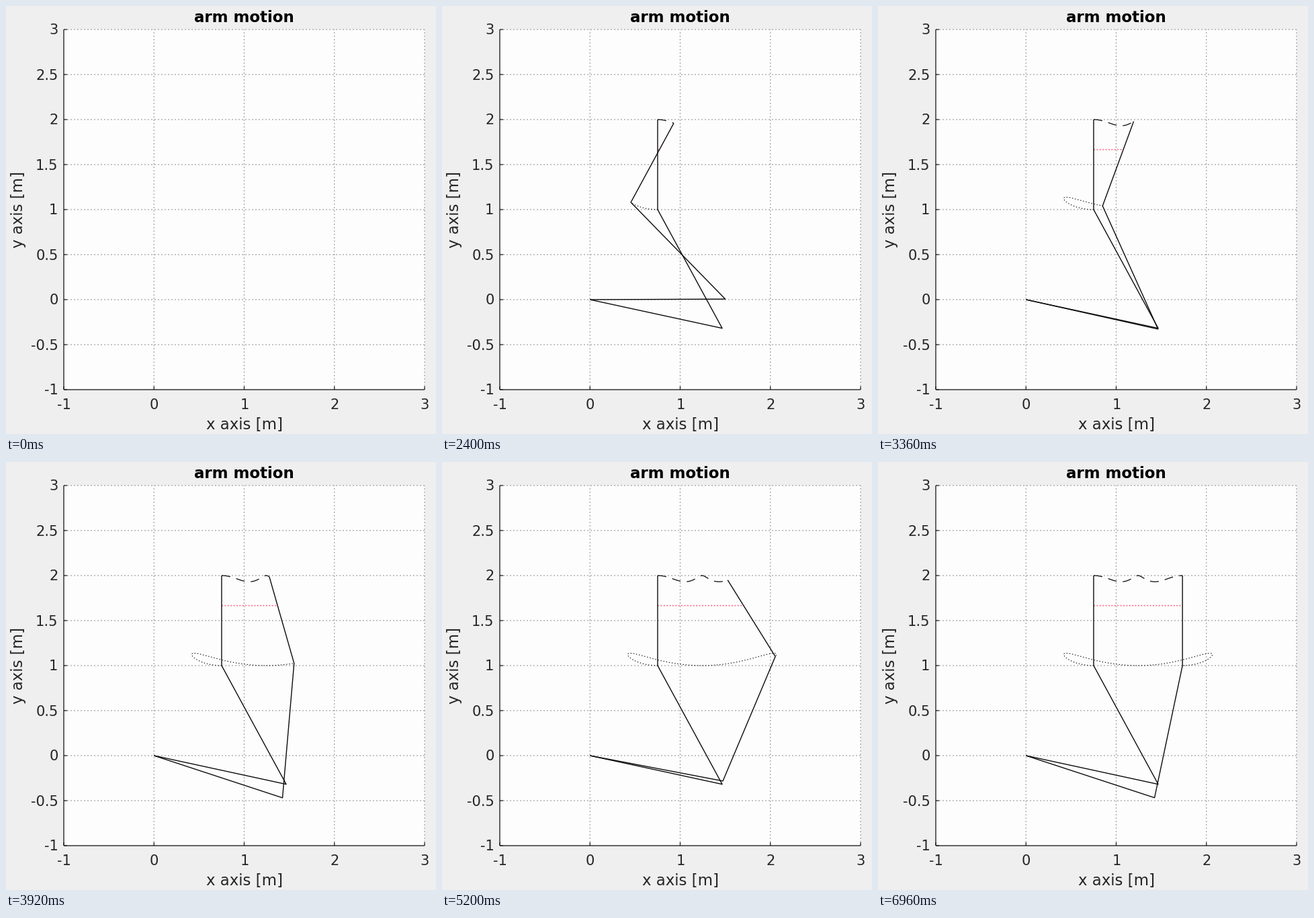
Write a matplotlib script that moves like this. It is 640 px wide and 637 px high and loops after 7120 ms.

```python
import numpy as np
import matplotlib.pyplot as plt
from matplotlib.animation import FuncAnimation

W, H, DPI = 640, 637, 100
STEP_MS, FRAMES = 80, 89
START = 24                      # frame on which the arm appears
PX = 72 / DPI                   # points per pixel

LEFT, RIGHT, TOP, BOTTOM = 86, 623, 35, 571
LINK, HAND = 1.5, 1.0           # arm link lengths in metres
SWING = 0.654                   # wrist swing in radians
X0, X1, Y_MID = 0.75, 1.735, 5 / 3

INK, GRID = "#262626", "#a0a0a0"


def sx(x):
    return LEFT + (RIGHT - LEFT) * (np.asarray(x) + 1) / 4


def sy(y):
    return BOTTOM - (BOTTOM - TOP) * (np.asarray(y) + 1) / 4


fig = plt.figure(figsize=(W / DPI, H / DPI), dpi=DPI, facecolor="#efefef")
ax = fig.add_axes([0, 0, 1, 1])
ax.set_xlim(0, W)
ax.set_ylim(H, 0)
ax.axis("off")


def line(x, y, color="black", width=1.0, dash=None, z=3):
    """Pixel-space line; dash lengths are given in pixels."""
    style = "-" if dash is None else (0, tuple(d / width for d in dash))
    return ax.plot(x, y, color=color, lw=width * PX, ls=style, zorder=z,
                   dash_capstyle="butt", solid_capstyle="butt",
                   solid_joinstyle="round", snap=False)[0]


def label(x, y, text, size, **kw):
    opts = dict(family="DejaVu Sans", color=INK, ha="center", va="baseline")
    opts.update(kw)
    ax.text(x, y, text, fontsize=size * PX, **opts)


def draw_axes():
    ax.add_patch(plt.Rectangle((LEFT, TOP), RIGHT - LEFT, BOTTOM - TOP,
                               fc="#fdfdfd", ec="none", zorder=0))
    for v in range(-1, 4):
        x = sx(v)
        if v > -1:
            line([x, x], [BOTTOM, TOP], GRID, 1.2, (2, 3), 1)
        line([x, x], [BOTTOM, BOTTOM - 5], INK, 1.3)
        label(x + 0.5, 600.5, str(v), 21)
    for v in np.arange(-1, 3.1, 0.5):
        y = sy(v)
        if v > -1:
            line([LEFT, RIGHT], [y, y], GRID, 1.2, (2, 3), 1)
        line([LEFT, LEFT + 5], [y, y], INK, 1.3)
        label(77.5, y + 7.5, f"{v:g}", 21, ha="right")
    line([LEFT, LEFT], [TOP, BOTTOM], INK, 1.4)
    line([LEFT, RIGHT], [BOTTOM, BOTTOM], INK, 1.4)
    label(354.5, 24, "arm motion", 22.9, color="black", weight="bold")
    label(355, 630, "x axis [m]", 22.9)
    label(25.5, 303, "y axis [m]", 22.9, rotation=90, rotation_mode="anchor")


def pose(s):
    """Elbow, wrist, guided point and tip at path parameter s in 0..1."""
    u = s**3 * (10 - 15 * s + 6 * s**2)
    turn = -SWING * np.sin(2 * np.pi * s)
    gx, gy = X0 + (X1 - X0) * u, Y_MID + 0 * u
    dx, dy = -np.sin(turn), np.cos(turn)
    wx, wy = gx - HAND * 2 / 3 * dx, gy - HAND * 2 / 3 * dy
    tx, ty = gx + HAND / 3 * dx, gy + HAND / 3 * dy
    reach = np.hypot(wx, wy)
    h = np.sqrt(LINK**2 - reach**2 / 4)
    ex, ey = wx / 2 + h * wy / reach, wy / 2 - h * wx / reach
    return (ex, ey), (wx, wy), (gx, gy), (tx, ty)


def progress(n):
    """Path parameter n steps after the start; the pace slows down gradually."""
    return np.interp(n, [0, 12, 25, 35, 41, 52, 53],
                     [0.002, 0.272, 0.57, 0.745, 0.838, 0.9936, 1])


def put_arm(arm, s):
    elbow, wrist, _, tip = pose(s)
    pts = np.array([(0, 0), elbow, wrist, tip])
    arm.set_data(sx(pts[:, 0]), sy(pts[:, 1]))


draw_axes()
wrist_trail = line([], [], "#1a1a1a", 1.2, (1.4, 2.8))
mid_trail = line([], [], "#ff6482", 1.6, (2, 2.4))
tip_trail = line([], [], "#111111", 1.3, (13, 9.3))
home_arm = line([], [], "#0c0c0c", 1.4, z=4)
arm = line([], [], "#0c0c0c", 1.4, z=4)
moving = (wrist_trail, mid_trail, tip_trail, home_arm, arm)


def update(frame):
    n = frame - START
    for item in moving:
        item.set_visible(n >= 0)
    if n >= 0:
        s = progress(n)
        put_arm(home_arm, 0.0)
        put_arm(arm, s)
        path = pose(np.linspace(0, s, 240))
        for trail, (x, y) in zip((wrist_trail, mid_trail, tip_trail), path[1:]):
            trail.set_data(sx(x), sy(y))
    return moving


anim = FuncAnimation(fig, update, frames=FRAMES, interval=STEP_MS,
                     init_func=lambda: update(0), repeat=True, repeat_delay=0)
plt.show()
```
